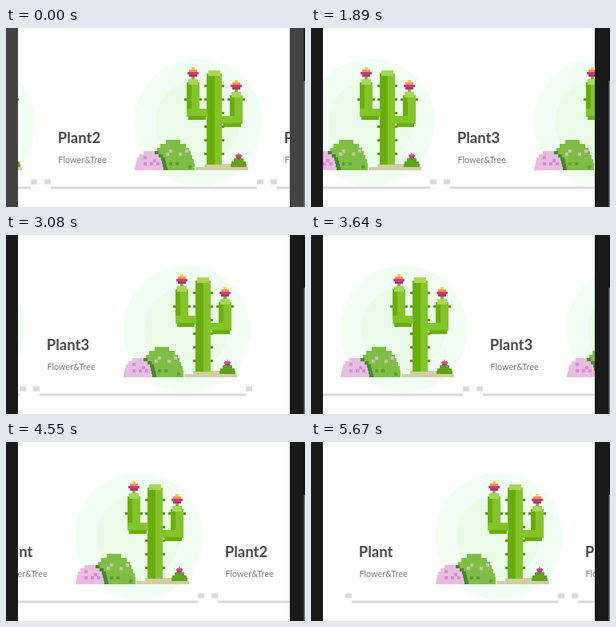
These frames come from a looping animation (374x224 px, 5740 ms). An HTML page:

```html
<!DOCTYPE html>
<html lang="en">
<head>
<meta charset="utf-8">
<title>Plant cards</title>
<style>
  html, body { margin: 0; width: 100%; height: 100%; overflow: hidden; background: #fff; }
  svg { display: block; width: 374px; height: 224px; }
  text { font-family: Lato, "Open Sans", sans-serif; }
  .title { font-size: 18.6px; font-weight: 700; fill: #4a4a4a; }
  .sub { font-size: 10.8px; fill: #777; }
</style>
</head>
<body>
<svg viewBox="0 0 374 224" xmlns="http://www.w3.org/2000/svg">
  <defs>
    <clipPath id="view"><rect x="15" width="340" height="224"/></clipPath>
    <g id="plant">
      <circle cx="240" cy="118" r="79.5" fill="#f1fef3"/>
      <circle cx="239.5" cy="118" r="52.5" fill="#eafbe7"/>
      <g id="art" shape-rendering="crispEdges"></g>
    </g>
  </defs>
  <rect width="374" height="224" fill="#fff"/>
  <g clip-path="url(#view)"><g id="track"></g></g>
  <g id="bars">
    <rect width="15" height="224"/>
    <rect x="355" width="19" height="224"/>
  </g>
  <rect x="372.5" width="1.5" height="66" fill="#111"/>
  <rect x="372.5" y="66" width="1.5" height="158" fill="#777"/>
</svg>
<script>
const NS = "http://www.w3.org/2000/svg";
const $ = id => document.getElementById(id);
const art = $("art"), track = $("track"), bars = $("bars");

const LOOP = 5740, STEP = 70, PITCH = 283;
const DARK = "#69ad0b", MID = "#84c42b", LIGHT = "#a8d658", SPIKE = "#579317";

function add(parent, tag, attrs, text) {
  const el = document.createElementNS(NS, tag);
  for (const key in attrs) el.setAttribute(key, attrs[key]);
  if (text) el.textContent = text;
  return parent.appendChild(el);
}

function box(fill, x, y, width, height, parent = art) {
  add(parent, "rect", { x, y, width, height, fill });
}

let seed = 11;
function random() {
  seed = (seed * 16807) % 2147483647;
  return seed / 2147483647;
}

// Half ellipse built from stepped rows.
function mound(fill, cx, rx, top, bottom, rows) {
  const h = (bottom - top) / rows;
  for (let i = 0; i < rows; i++) {
    const u = 1 - (i + 0.5) / rows;
    const half = Math.round(rx * Math.sqrt(1 - u * u));
    box(fill, cx - half, top + i * h, half * 2, h);
  }
}

function speckle(fill, count, cx, rx, top, bottom) {
  for (let i = 0; i < count; i++) {
    const x = cx + (2 * (i + random()) / count - 1) * rx;
    const y = top + random() * (bottom - top);
    box(fill, Math.round(x / 4) * 4, Math.round(y / 4) * 4, 4, 4);
  }
}

function stem(x, width, top, bottom, shade) {
  for (let y = 72; y < bottom - 8; y += 17) {
    if (y > top + 8) box(SPIKE, x - 3, y - 1, width + 6, 3);
  }
  box(MID, x, top + 4, width, bottom - top - 4);
  box(DARK, x, top + 4, width * shade, bottom - top - 4);
  box(LIGHT, x + 2, top, width - 4, 7);
}

function elbow(x, top) {
  box(MID, x, top, 26, 10);
  box(DARK, x + 2, top + 9, 22, 5);
}

function flower(cx, top, cell, colors) {
  colors.forEach((fill, i) => {
    const width = cell * (4.6 - 1.5 * Math.abs(i - 2));
    box(fill, cx - width / 2, top + i * cell, width, cell);
  });
}

function drawPlant() {
  mound("#7fbe45", 209, 27, 140, 178, 8);
  mound("#4b852f", 184, 18, 154, 178, 6);
  mound("#e9bce3", 179, 18, 154, 178, 6);
  speckle("#c6c8ac", 5, 212, 14, 150, 164);
  speckle("#5b9a37", 3, 216, 14, 164, 172);
  speckle("#d78bca", 5, 179, 10, 160, 172);

  mound("#d0cfa4", 270, 34, 170, 178, 2);
  mound("#64a31f", 291, 10, 163, 174, 3);
  flower(291, 156, 1.7, ["#e8a05c", "#d9568c", "#d4498d", "#b83a86", "#8a5a50"]);

  stem(251, 19, 53, 171, 0.55);
  stem(226, 16, 64, 101, 0.35);
  stem(280, 16, 80, 110, 0.35);
  elbow(226, 101);
  elbow(270, 110);
  const petals = ["#f8cd4b", "#f0964e", "#d23a72", "#a93583", "#7fb52a"];
  flower(234, 48.5, 3, petals);
  flower(288, 64.5, 3, petals);
}

function drawCard(name, index) {
  const card = add(track, "g", { transform: `translate(${index * PITCH} 0)` });
  add(card, "use", { href: "#plant" });
  add(card, "text", { x: 64.7, y: 144, class: "title" }, name);
  add(card, "text", { x: 65.5, y: 169, class: "sub" }, "Flower&Tree");
  const gray = "#d9d9db";
  box(gray, 56, 198.5, 258, 3, card);
  for (const x of [48, 314]) box(gray, x, 189.5, 8, 6, card);
}

// Critically damped glide from 0 to 1.
function glide(ms, tau) {
  const k = Math.max(0, ms) / tau;
  return 1 - (1 + k) * Math.exp(-k);
}

function scrollAt(t) {
  const turn = 3235;
  const forward = 304 * glide(Math.min(t, turn) - 1326, 311);
  return forward - (forward + 284) * glide(t - turn, 368);
}

function render(t) {
  t = Math.floor(t / STEP) * STEP;
  track.setAttribute("transform", `translate(${-Math.round(scrollAt(t))} 0)`);
  const fade = Math.min(1, Math.max(0, (t - 1330) / 350));
  const shade = Math.round(67 - 41 * fade);
  bars.setAttribute("fill", `rgb(${shade},${shade},${shade})`);
}

drawPlant();
["Plant", "Plant2", "Plant3"].forEach((name, i) => drawCard(name, i - 1));

const start = performance.now();
function tick() {
  render((performance.now() - start) % LOOP);
  requestAnimationFrame(tick);
}
tick();
</script>
</body>
</html>
```
